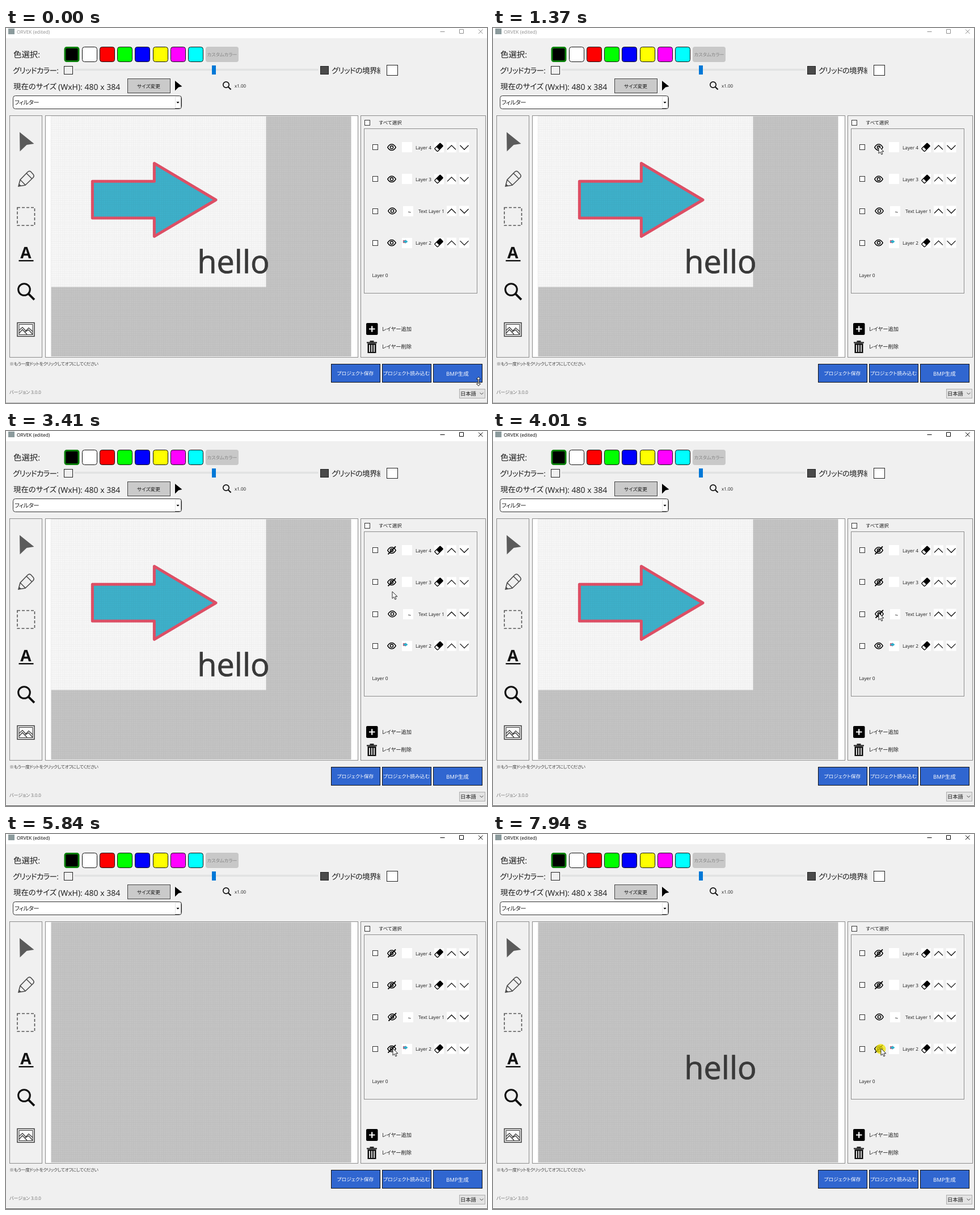
Animation of 848 by 661 pixels, one loop 8000 ms. Source, as an HTML page:

```html
<!DOCTYPE html>
<html lang="ja">
<head>
<meta charset="utf-8">
<title>Layer editor</title>
<style>
html, body { margin: 0; width: 100%; height: 100%; overflow: hidden; background: #f0f0f0; }
svg { display: block; width: 100%; height: 100%; }
text {
  font-family: "Open Sans", "Noto Sans CJK JP", "Noto Sans CJK", sans-serif;
  font-feature-settings: "palt";
  text-rendering: geometricPrecision;
  white-space: pre;
}
</style>
</head>
<body>
<svg id="stage" viewBox="0 0 848 661"></svg>
<script>
const stage = document.getElementById('stage');

// ---- drawing helpers: each returns a piece of markup ----
const attrs = o => Object.entries(o).map(([k, v]) => ` ${k}="${v}"`).join('');
const tag = (name, o, body = '') => `<${name}${attrs(o)}>${body}</${name}>`;
const group = (o, ...parts) => tag('g', o, parts.join(''));
const rect = (x, y, width, height, fill, o = {}) => tag('rect', { x, y, width, height, fill, ...o });
const box = (x, y, w, h, fill, stroke, o = {}) =>
  rect(x + .5, y + .5, w - 1, h - 1, fill, { stroke, ...o });
const line = (d, stroke, width, o = {}) =>
  tag('path', { d, fill: 'none', stroke, 'stroke-width': width, ...o });
const shape = (d, fill, o = {}) => tag('path', { d, fill, ...o });
const circle = (cx, cy, r, o) => tag('circle', { cx, cy, r, ...o });
const label = (x, cy, size, str, o = {}) =>
  tag('text', { x, y: cy + size * .37, 'font-size': size, fill: '#1a1a1a', ...o }, str);
const mid = { 'text-anchor': 'middle' };

function titleBar() {
  return rect(0, 0, 848, 18, '#fff') + rect(4, 1, 11, 10, '#8b9a9c') +
    group({ id: 'title' },
      label(19, 6.5, 8.4, 'ORVEK (edited)', { fill: 'currentColor' }),
      line('M765.5 6.5h8M799.5 2.5h7v7h-7zM833 2.5l7.5 7.5m0-7.5l-7.5 7.5', 'currentColor', 1)) +
    rect(0, 660, 848, 1, '#b4b4b4', { id: 'edge' });
}

function magnifier(x, y, r, w, len) {
  const a = r * .72;
  return circle(x, y, r, { fill: 'none', stroke: '#111', 'stroke-width': w }) +
    line(`M${x + a} ${y + a}l${len} ${len}`, '#111', w * 1.25);
}

function topRows() {
  const colors = ['#000', '#fff', '#f00', '#0f0', '#00f', '#ff0', '#f0f', '#0ff'];
  const tight = { 'letter-spacing': -.7 };
  let s = label(13, 47, 14.4, '色選択:');
  colors.forEach((c, i) => {
    const x = Math.round(102.6 + i * 31.2);
    s += i ? box(x, 33, 27, 27, c, '#111', { rx: 4 })
           : rect(104, 34.5, 24, 24, c, { rx: 3, stroke: '#0a800a', 'stroke-width': 3 });
  });
  s += rect(352, 33, 58, 27, '#c8c8c8', { rx: 4 }) +
    label(381, 46.5, 8.3, 'カスタムカラー', { ...mid, fill: '#848484' });

  s += label(12, 75.5, 13.5, 'グリッドカラー:', tight) +
    box(102, 67, 16, 15, '#f0f0f0', '#222') +
    box(121, 72, 429, 3, '#e7eaea', '#dcdcdc') +
    rect(363, 66, 7, 16, '#0078d7') +
    box(554, 67, 15, 15, '#4a4a4a', '#222') +
    group({ 'clip-path': 'url(#cut)' }, label(574, 75.5, 13.5, 'グリッドの境界線', tight)) +
    box(671, 65, 20, 19, '#fff', '#222');

  s += label(13, 103.5, 13.4, '現在のサイズ') +
    label(92, 103.5, 14.05, '(WxH): 480 x 384') +
    box(214, 89, 76, 26, '#cacaca', '#444') +
    label(251.5, 102.5, 8.7, 'サイズ変更', mid) +
    shape('M298 93L310.5 103L304 104.5L298 110.5Z', '#000') +
    magnifier(388, 100, 5.2, 1.7, 4.8) +
    label(403, 102.5, 8, 'x1.00');

  s += box(12, 119, 298, 24, '#fff', '#333', { rx: 4 }) +
    label(15, 131.5, 10.4, 'フィルター', { 'letter-spacing': -.5 }) +
    line('M298.5 140V121.5H308', '#e3e3e3', 1) +
    line('M298 141.5H308.5V121', '#777', 1) +
    shape('M300.5 130h5l-2.5 3z', '#000');
  return s;
}

function tools() {
  return box(6, 154, 58, 427, '#f0f0f0', '#8c8c8c') +
    shape('M24 183.5L49.5 204L36.5 206L24.5 217.5Z', '#5b5b5b') +
    line('M22 279L25 267.5L38 254Q41 251 44 253.5L48 258Q50.5 261 47.5 264L34 277Z' +
         'M36 256L45.5 265.5M25.5 268L34 276.5', '#4c4c4c', 1.6) +
    shape('M22 279L23.3 274.5L26.5 277.8Z', '#4c4c4c') +
    rect(20, 316.5, 30.5, 31.5, 'none', { stroke: '#555', 'stroke-width': 1.6, 'stroke-dasharray': '5 3' }) +
    tag('text', { x: 35, y: 406, 'font-size': 28, 'font-weight': 700, fill: '#111', ...mid }, 'A') +
    rect(22.5, 409, 26, 2.4, '#111') +
    magnifier(32, 461, 10.3, 3.1, 10.5) +
    rect(20, 519.5, 30, 24, '#f0f0f0', { stroke: '#333', 'stroke-width': 1.4 }) +
    rect(23, 522.5, 24, 18, '#fafafa', { stroke: '#333' }) +
    line('M23 533L29 527.5L35 534L40 528.5L47 535M23 538L29 531.5L37 540M33 536L40 532L47 540', '#333', 1.2);
}

function canvasPane() {
  const arrow = 'M152.4 270.2H261.4V238.4L370 303L261.4 367.3V335H152.4Z';
  return box(69, 154, 552, 427, '#fff', '#8c8c8c') +
    rect(79.5, 155.5, 529, 423.5, '#c7c7c7') +
    group({ id: 'picture' },
      rect(79.5, 155.5, 379, 301, '#fbfbfb'),
      shape(arrow, '#3fb3cd', { stroke: '#e35168', 'stroke-width': 5, 'stroke-linejoin': 'round' })) +
    tag('text', { id: 'word', x: 337.3, y: 431.5, 'font-size': 55.8, fill: '#3b3b3b',
      stroke: '#3b3b3b', 'stroke-width': .8 }, 'hello') +
    rect(79.5, 155.5, 529, 423.5, 'url(#grid)');
}

function eye(id, x, y) {
  return group({ transform: `translate(${x} ${y})` },
    line('M-7.2 0Q-4.4 -5.2 0 -5.2T7.2 0Q4.4 5.2 0 5.2T-7.2 0Z', '#000', 1.5),
    circle(0, 0, 2.6, { fill: 'none', stroke: '#000', 'stroke-width': 1.4 }),
    line('M-6.5 7L7 -6.8', '#000', 1.8, { id, visibility: 'hidden' }));
}

function eraser(x, y) {
  return rect(x - 8, y - 9, 17, 18, '#fff') +
    group({ transform: `translate(${x} ${y}) rotate(-45)` },
      rect(-7, -3.7, 14, 7.4, '#fff', { rx: 1.3, stroke: '#000', 'stroke-width': 1.3 }),
      rect(-2.5, -3.7, 9.5, 7.4, '#000', { rx: 1 }));
}

function layerRow(name, i) {
  const y = 210.3 + i * 56.1, isText = i === 2, dx = isText ? 1 : 0;
  return box(646, Math.round(y - 5), 10, 10, '#fff', '#333') +
    eye('slash' + i, 680 + dx, y) +
    rect(698 + dx * 2, Math.round(y - 9), 18, 18, '#fff') +
    label(isText ? 727 : 722, y + .8, 8.3, name) +
    (isText ? '' : eraser(763, y)) +
    rect(777, y - 9, 17, 18, '#fff') + rect(799, y - 9, 17.5, 18, '#fff') +
    line(`M778 ${y + 4}l7.5 -7.5l7.5 7.5M800.5 ${y - 3.5}l7.5 7.5l7.5 -7.5`, '#111', 1.3);
}

function layerPane() {
  return box(625, 154, 221, 427, '#f0f0f0', '#8c8c8c') +
    box(632, 162, 10, 10, '#fff', '#333') +
    label(657.5, 166.8, 8.5, 'すべて選択') +
    box(631, 177, 200, 291, '#f0f0f0', '#8c8c8c') +
    ['Layer 4', 'Layer 3', 'Text Layer 1', 'Layer 2'].map(layerRow).join('') +
    rect(709.5, 323.7, 1.6, 1.3, '#333') + rect(711.7, 324.2, 1.6, 1.3, '#333') +
    shape('M700 374.5h4v-1.5l4.5 3.5l-4.5 3.5v-1.5h-4z', '#2fb0cc') +
    line('M700 374.5h4M700 378.5h4M700.4 374.5v4', '#e0506a', .9) +
    label(645.5, 436, 8.3, 'Layer 0') +
    rect(635, 520, 20.5, 21, '#000', { rx: 2 }) +
    line('M640 530.5h10.5M645.2 525.2v10.5', '#fff', 2.2) +
    label(662.5, 531, 9.3, 'レイヤー追加') +
    line('M636 554.5h18M641.5 552.2h7', '#111', 2) +
    rect(638.5, 557, 13, 15, '#111', { stroke: '#111', 'stroke-width': 2 }) +
    line('M641 558.5v12.5M645 558.5v12.5M649 558.5v12.5', '#f0f0f0', 1.8) +
    label(662.5, 562, 9.3, 'レイヤー削除');
}

function footer() {
  const button = (x, str, size) => box(x, 592, 87, 33, '#3066d0', '#111') +
    label(x + 43, 609, size, str, { ...mid, fill: '#fff' });
  return label(6, 592.5, 8, '※もう一度ドットをクリックしてオフにしてください',
      { fill: '#444', 'letter-spacing': -.52 }) +
    label(6, 642.5, 8.1, 'バージョン 3.0.0', { fill: '#707070', 'letter-spacing': -.1 }) +
    button(573, 'プロジェクト保存', 8.8) +
    button(663, 'プロジェクト読み込む', 8.8) +
    button(753, 'BMP生成', 9.6) +
    box(799, 636, 46, 17, '#e3e3e3', '#adadad') +
    label(801, 644.5, 9.3, '日本語') +
    line('M835.5 642.8l3 3l3 -3', '#444', 1);
}

function pointer() {
  const ink = { stroke: '#111', 'stroke-width': .9 };
  return circle(0, 0, 9, { id: 'press', fill: '#f0e400', opacity: .75 }) +
    group({ id: 'cursor' },
      shape('M0 0V12.2L2.9 9.5L4.9 14L6.9 13.1L5 8.8H9Z', '#fff', { id: 'arrow', ...ink }),
      shape('M0 -8L3.6 -4H1V4H3.6L0 8L-3.6 4H-1V-4H-3.6Z', '#fff', { id: 'resize', ...ink }));
}

const defs = `<defs>
  <pattern id="grid" x="79" y="155" width="3.3" height="3.3" patternUnits="userSpaceOnUse">
    <path d="M0 .5H3.3M.5 0V3.3" stroke="#000" stroke-opacity=".055"/>
  </pattern>
  <clipPath id="cut"><rect x="572" y="60" width="88" height="30"/></clipPath>
</defs>`;

stage.innerHTML = defs + rect(0, 0, 848, 661, '#f0f0f0') + titleBar() + topRows() +
  tools() + canvasPane() + layerPane() + footer() + pointer();

// ---- motion ----
const LOOP = 8000, TICK = 67;
const path = [
  [0, 833, 623], [69, 833, 623], [70, 836, 637], [330, 764, 455], [400, 771, 439],
  [533, 771, 439], [1100, 661, 189], [1370, 680, 209],
  [2183, 680, 209], [2384, 693, 224], [2590, 689, 239], [2800, 681, 263],
  [3273, 681, 263], [3610, 680, 321],
  [4143, 680, 321], [4630, 682, 378],
  [6503, 682, 378], [6840, 684, 306], [7000, 683, 317],
  [7333, 683, 317], [7535, 684, 378], [LOOP, 684, 378]
];
const presses = [[1440, 1580], [2870, 3000], [3740, 3870], [4960, 5100], [7070, 7200], [7810, LOOP]];
const hidden = [[2250, LOOP], [3070, LOOP], [3940, 7270], [5170, LOOP]];

const within = (t, [a, b]) => t >= a && t < b;
const $ = id => document.getElementById(id);
const show = (id, on) => $(id).setAttribute('visibility', on ? 'visible' : 'hidden');

function cursorAt(t) {
  let i = path.length - 2;
  while (path[i][0] > t) i--;
  const [t0, x0, y0] = path[i], [t1, x1, y1] = path[i + 1];
  const u = Math.floor((t - t0) / TICK + .02) * TICK / (t1 - t0);
  const e = u * u * (3 - 2 * u);
  return [Math.round(x0 + (x1 - x0) * e), Math.round(y0 + (y1 - y0) * e)];
}

function draw(t) {
  const [x, y] = cursorAt(t), active = t >= 1440;
  $('cursor').setAttribute('transform', `translate(${x} ${y})`);
  $('press').setAttribute('transform', `translate(${x - .5} ${y + 1})`);
  show('press', presses.some(p => within(t, p)));
  show('resize', t < 70);
  show('arrow', t >= 70);
  hidden.forEach((span, i) => show('slash' + i, within(t, span)));
  show('word', !within(t, [4010, 7330]));
  show('picture', t < 5840);
  $('title').setAttribute('color', active ? '#000' : '#8e8e8e');
  $('edge').setAttribute('fill', active ? '#555' : '#b4b4b4');
}

const start = performance.now();
function frame() {
  draw((performance.now() - start) % LOOP);
  requestAnimationFrame(frame);
}
draw(0);
requestAnimationFrame(frame);
</script>
</body>
</html>
```
